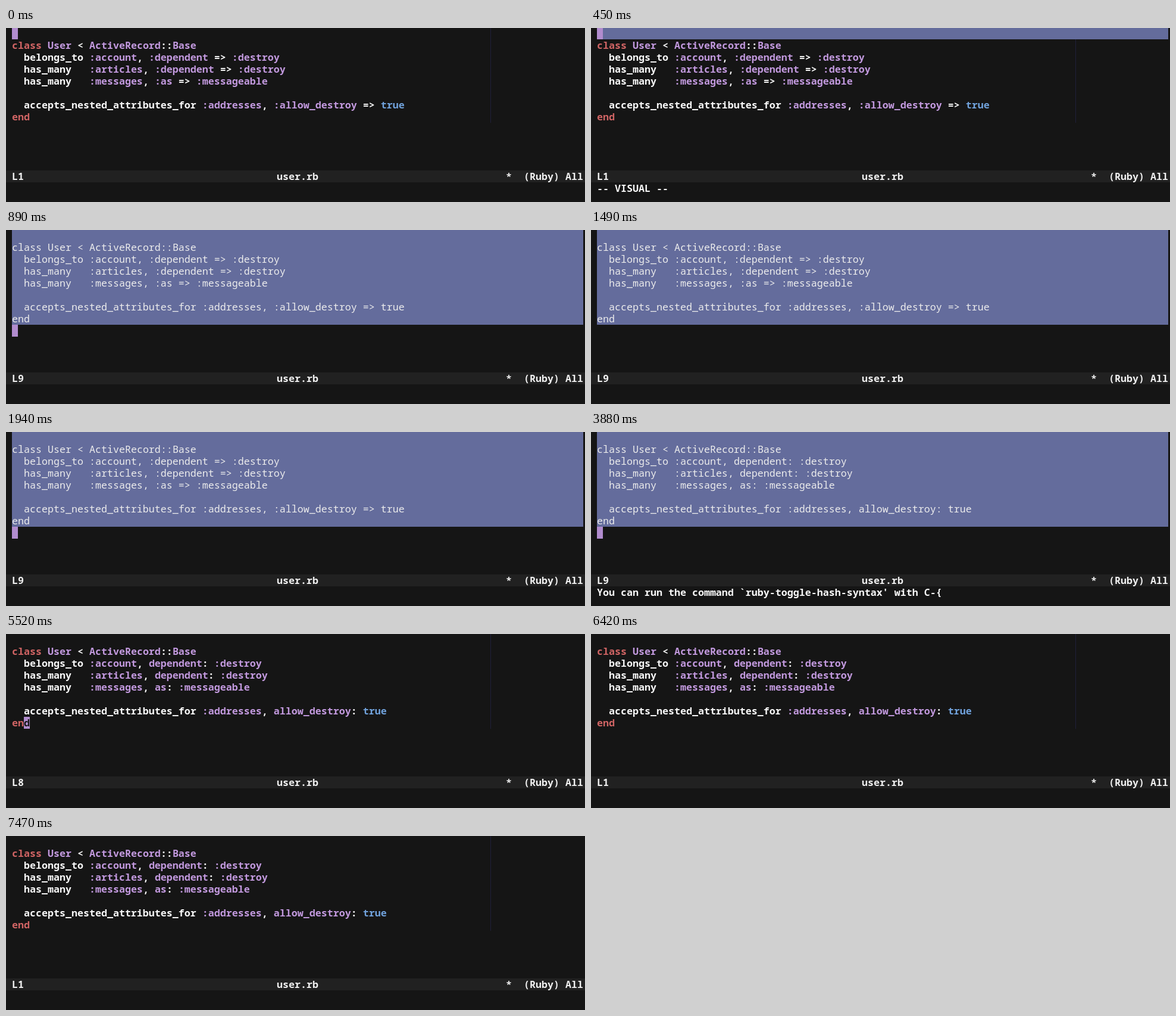
These frames come from a looping animation (973 by 292 pixels, 7630 ms). An HTML page:

```html
<!DOCTYPE html>
<html lang="en">
<head>
<meta charset="utf-8">
<title>Ruby hash syntax toggle</title>
<style>
  html, body { margin: 0; width: 100%; height: 100%; overflow: hidden; background: #151515; }
  #stage {
    position: relative; width: 973px; height: 292px; overflow: hidden;
    background: #151515; color: #f8f8f8;
    font: 600 16.667px/20px "Noto Sans Mono", "DejaVu Sans Mono", monospace;
    font-variant-ligatures: none;
  }
  #stage > *, .at { position: absolute; }
  /* Character grid: 10 x 20 px cells, first row clipped by one pixel. */
  .at {
    left: calc(10px + var(--c, 0) * 10px);
    top: calc(var(--r) * 20px - 1px);
    margin: 0; font: inherit; white-space: pre;
  }
  [hidden] { display: none !important; }
  b, i, u { font: inherit; text-decoration: none; }
  b { color: #d06464; }
  i { color: #c299de; }
  u { color: #71a3dd; }
  .selected .code { color: #ececec; font-weight: 500; }
  .selected .code * { color: inherit; }
  .ruler { left: 814px; top: 0; width: 1px; height: 159px; background: #20203a; }
  .region { left: 10px; top: 0; width: 960px; background: #646c9c; }
  .cursor { width: 10px; height: 20px; background: #b18cce; color: #151515; }
  .hollow { box-sizing: border-box; background: none; border: 1px solid #b18cce; }
  .bar { width: 2px; height: 20px; background: #b18cce; }
  .mode { left: 0; width: 973px; height: 20px; background: #212121; color: #f0f0f0; }
  .mode .at { top: 0; }
  .panel { left: 0; top: 199px; width: 973px; height: 93px; background: #151515; }
  .prompt { width: 960px; white-space: pre-wrap; word-break: break-all; }
</style>
</head>
<body>
<div id="stage">
  <div class="ruler"></div>
  <div class="region" style="height:19px" data-on="450-890"></div>
  <div class="region" style="height:159px" data-on="890-5520"></div>

<pre class="code at" style="--r:1" data-on="0-3880"><b>class</b> <i>User</i> &lt; <i>ActiveRecord</i>::<i>Base</i>
  belongs_to <i>:account</i>, <i>:dependent</i> =&gt; <i>:destroy</i>
  has_many   <i>:articles</i>, <i>:dependent</i> =&gt; <i>:destroy</i>
  has_many   <i>:messages</i>, <i>:as</i> =&gt; <i>:messageable</i>

  accepts_nested_attributes_for <i>:addresses</i>, <i>:allow_destroy</i> =&gt; <u>true</u>
<b>end</b></pre>
<pre class="code at" style="--r:1" data-on="3880-7630"><b>class</b> <i>User</i> &lt; <i>ActiveRecord</i>::<i>Base</i>
  belongs_to <i>:account</i>, <i>dependent</i>: <i>:destroy</i>
  has_many   <i>:articles</i>, <i>dependent</i>: <i>:destroy</i>
  has_many   <i>:messages</i>, <i>as</i>: <i>:messageable</i>

  accepts_nested_attributes_for <i>:addresses</i>, <i>allow_destroy</i>: <u>true</u>
<b>end</b></pre>

  <div class="cursor at" style="--r:0" data-on="0-890 5970-6420 6870-7470"></div>
  <div class="cursor at" style="--r:8" data-on="890-1490 1940-2380 3880-5520"></div>
  <div class="cursor hollow at" style="--r:8" data-on="2380-3880"></div>
  <div class="cursor at" style="--r:7;--c:2" data-on="5520-5970">d</div>

  <div class="panel" data-on="2380-3880"></div>
  <div class="mode" id="mode">
    <span class="at" id="line">L1</span>
    <span class="at" style="--c:44.5">user.rb</span>
    <span class="at" style="--c:83">*  (Ruby) All</span>
  </div>

  <div class="at" style="--r:13" data-on="450-890">-- VISUAL --</div>
  <div class="at" style="--r:13" data-on="3880-5520">You can run the command `ruby-toggle-hash-syntax' with C-{</div>
  <div class="prompt at" style="--r:11" data-on="2380-3880">M-x {ruby-toggle-hash-syntax | eval-buffer | package-install | list-packages | describe-key | find-file | replace-string | query-replace | ruby-mode | sort-lines | align-regexp | whitespace-cleanup | rename-buffer | customize-group | revert-buffer | ...}</div>
  <div class="bar at" style="--r:11;--c:4" data-on="2380-2980 3430-3880"></div>
</div>
<script>
  const LOOP = 7630;
  const stage = document.getElementById('stage');
  const mode = document.getElementById('mode');
  const line = document.getElementById('line');
  const within = (t, from, to) => t >= from && t < to;
  const timed = [...document.querySelectorAll('[data-on]')].map(el => ({
    el, spans: el.dataset.on.split(' ').map(s => s.split('-').map(Number))
  }));

  function render(t) {
    for (const { el, spans } of timed) el.hidden = !spans.some(s => within(t, ...s));
    stage.classList.toggle('selected', within(t, 890, 5520));
    mode.style.top = within(t, 2380, 3880) ? '199px' : '239px';
    line.textContent = within(t, 890, 5520) ? 'L9' : within(t, 5520, 5970) ? 'L8' : 'L1';
  }

  const start = performance.now();
  function tick() {
    render((performance.now() - start) % LOOP);
    requestAnimationFrame(tick);
  }
  tick();
</script>
</body>
</html>
```
